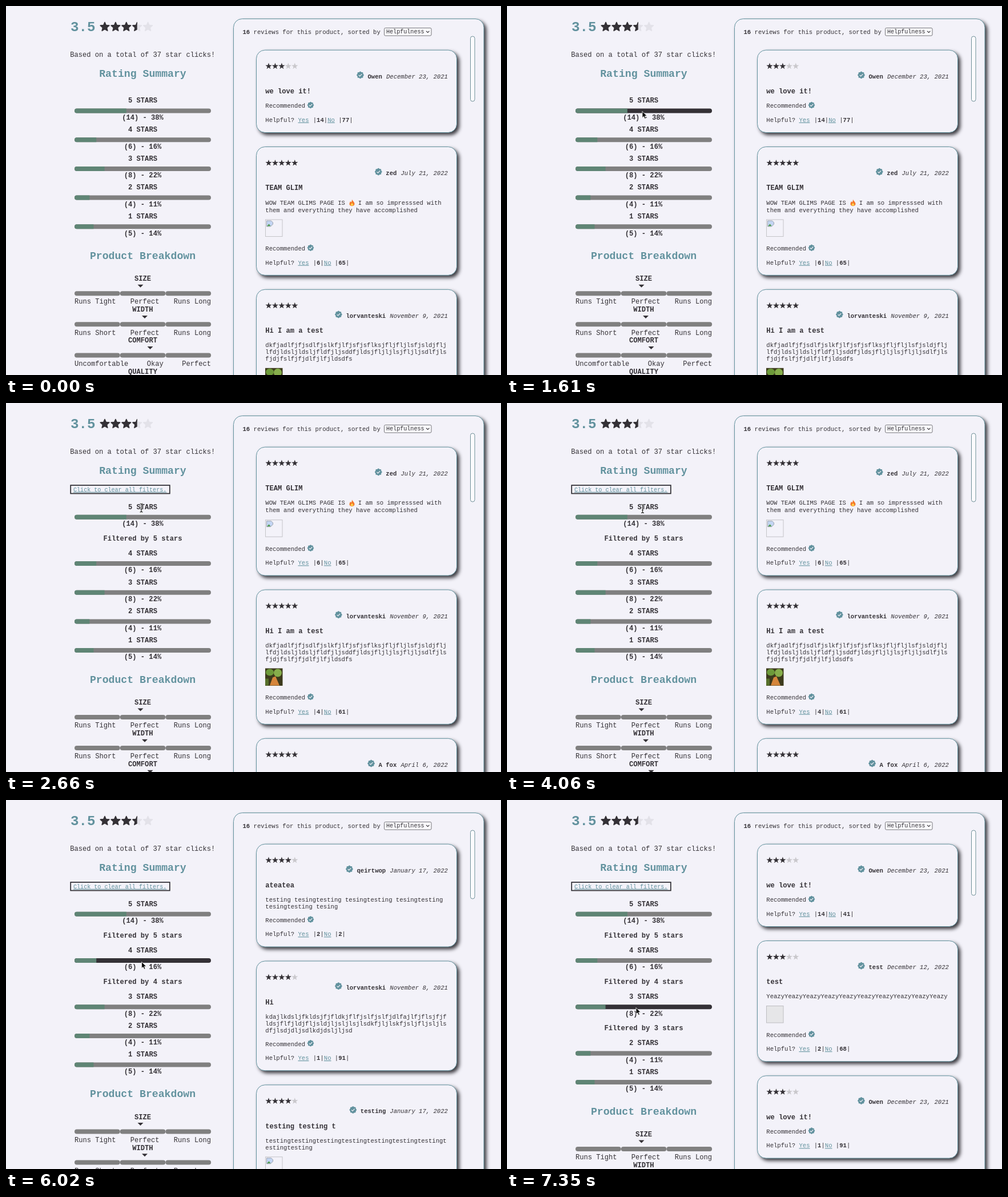
Write an HTML page that moves like this. It is 867x646 px and loops after 8 s.

```html
<!DOCTYPE html>
<html lang="en">
<head>
<meta charset="utf-8">
<title>Ratings and reviews</title>
<style>
  html, body { margin: 0; width: 100%; height: 100%; overflow: hidden; background: #f3f2f9; }
  svg { display: block; width: 867px; height: 646px; }
  text { font-family: "Liberation Mono", monospace; white-space: pre; fill: #343136; }
  .b { font-weight: bold; }
  .i { font-style: italic; }
  .teal { fill: #62929e; }
  .link { fill: #62929e; text-decoration: underline; }
  .card { fill: #f3f2f9; stroke: #62929e; filter: drop-shadow(4px 4px 3px #3b3a40); }
</style>
</head>
<body>
<svg viewBox="0 0 867 646" xmlns="http://www.w3.org/2000/svg">
  <g id="left"></g>
  <g id="right"></g>
  <g id="mouse"></g>
</svg>
<script>
const LOOP = 8000, STEP = 70;
const BG = '#f3f2f9', DARK = '#343136', TEAL = '#62929e';
const S = 10.59, M = 12.1, L = 18.16, XL = 24.2;   // font sizes
const CH = S * 0.6;
const el = id => document.getElementById(id);

// y is the middle of the capital letters
const text = (x, y, str, size = S, cls = '', anchor = 'start') =>
  `<text x="${x}" y="${y + size * 0.31}" font-size="${size}" class="${cls}" text-anchor="${anchor}">${str}</text>`;
const rect = (x, y, w, h, r, fill, more = '') =>
  `<rect x="${x}" y="${y}" width="${w}" height="${h}" rx="${r}" fill="${fill}" ${more}/>`;
const path = (d, fill, more = '') => `<path d="${d}" fill="${fill}" ${more}/>`;

function star(cx, cy, r, fill, more = '', inner = 0.42) {
  let d = '';
  for (let i = 0; i < 10; i++) {
    const a = (i / 5 - 0.5) * Math.PI, k = i % 2 ? r * inner : r;
    d += (i ? 'L' : 'M') + (cx + k * Math.cos(a)).toFixed(2) + ' ' + (cy + k * Math.sin(a)).toFixed(2);
  }
  return path(d + 'Z', fill, more);
}

function badge(cx, cy, r) {
  let d = '';
  for (let i = 0; i < 48; i++) {
    const a = i / 24 * Math.PI, k = r * (0.92 + 0.08 * Math.cos(8 * a));
    d += (i ? 'L' : 'M') + (cx + k * Math.cos(a)).toFixed(2) + ' ' + (cy + k * Math.sin(a)).toFixed(2);
  }
  return path(d + 'Z', TEAL) +
    path(`M${cx - 2.7} ${cy + 0.1}l1.9 1.9l3.6 -3.8`, 'none', `stroke="${BG}" stroke-width="1.2"`);
}

// ---- reviews ----
const flame = (x, y) =>
  path(`M${x} ${y - 6}c1 3 4.5 4.500 4.500 8c0 5 -9 5 -9 0c0 -2 1.200 -3 1.500 -4.500c1 .5 1.200 1 1.500 1.800c1 -1.500 1.500 -3 1.500 -5.300z`, '#f4792b') +
  path(`M${x} ${y}c.5 1.500 2.300 2.200 2.300 3.600c0 2.200 -4.600 2.200 -4.600 0c0 -1.400 1.800 -2 2.300 -3.600z`, '#fcd34a');

const thumbs = {
  broken: y => rect(454.5, y + 0.5, 29.500, 29.500, 0, 'none', 'stroke="#c4c4c8"') +
    path(`M456.500 ${y + 2.500}h8l3 3v3l-4 4h-7z`, '#c3d5f3', 'stroke="#8f949c" stroke-width=".8"') +
    path(`M457 ${y + 12}l3.500 -4l3 3.500z`, '#4f9a4b'),
  greens: y => rect(454, y, 30.500, 30.500, 0, '#3c3a1c') +
    `<ellipse cx="462" cy="${y + 7}" rx="7" ry="6" fill="#6d9a3a"/>` +
    `<ellipse cx="476" cy="${y + 8}" rx="7" ry="7" fill="#86ae4b"/>` +
    path(`M462 ${y + 30}l5 -14l5 -2l7 16z`, '#d5853b') +
    rect(454, y + 18, 6, 12, 0, '#57702b'),
  plain: y => rect(454.5, y + 0.5, 29.500, 29.500, 0, '#e6e6e8', 'stroke="#bdbdc1"')
};

const review = (stars, name, date, title, yes, no, body = [], pic = '') =>
  ({ stars, name, date, title, yes, no, body, pic });

const team = review(5, 'zed', 'July 21, 2022', 'TEAM GLIM', 6, 65,
  ['WOW TEAM GLIMS PAGE IS \u0001I am so impresssed with', 'them and everything they have accomplished'], 'broken');
const long = review(5, 'lorvanteski', 'November 9, 2021', 'Hi I am a test', 4, 61,
  ['dkfjadlfjfjsdlfjslkfjlfjsfjsflksjfljfljlsfjsldjflj',
   'lfdjldsljldsljfldfjljsddfjldsjfljljlsjfljljsdlfjls',
   'fjdjfslfjfjdlfjlfjldsdfs'], 'greens');
const love = (yes, no) => review(3, 'Owen', 'December 23, 2021', 'we love it!', yes, no);

const lists = [
  [love(14, 77), team, long],
  [team, long, review(5, 'A fox', 'April 6, 2022', '', 1, 1)],
  [review(4, 'qeirtwop', 'January 17, 2022', 'ateatea', 2, 2,
     ['testing tesingtesting tesingtesting tesingtesting', 'tesingtesting tesing']),
   review(4, 'lorvanteski', 'November 8, 2021', 'Hi', 1, 91,
     ['kdajlkdsljfkldsjfjfldkjflfjslfjslfjdlfajlfjflsjfjf',
      'ldsjflfjldjfljsldjljsljlsjlsdkfjljlskfjsljfljsljls',
      'dfjlsdjdljsdlkdjdsljljsd']),
   review(4, 'testing', 'January 17, 2022', 'testing testing t', 1, 1,
     ['testing'.repeat(7) + 't', 'estingtesting'], 'broken')],
  [love(14, 41),
   review(3, 'test', 'December 12, 2022', 'test', 2, 68, ['Yeazy'.repeat(10)], 'plain'),
   love(1, 91)]
];

function card(r, top) {
  const x = 454.3;
  let out = '';
  for (let i = 0; i < 5; i++)
    out += star(460 + i * 11.45, top + 28.3, 5.9, i < r.stars ? DARK : '#c9c8cc', '', 0.4);

  const dateX = 774 - r.date.length * CH, nameX = dateX - (r.name.length + 1) * CH - 0.7;
  out += text(dateX, top + 46.4, r.date, S, 'i') + text(nameX, top + 46.4, r.name, S, 'b') +
    badge(nameX - 13, top + 43.7, 6.4) + text(x, top + 72, r.title, M, 'b');

  let last = top + 74;
  const emoji = r.body.length && r.body[0].includes('\u0001');
  r.body.forEach((line, i) => {
    last = top + (emoji ? 98 + i * 13 : 97.5 + i * 12);
    const [head, tail] = line.split('\u0001');
    out += text(x, last, head);
    if (tail) out += flame(606, last) + text(616.7, last, tail);
  });
  if (r.pic) {
    out += thumbs[r.pic](last + 16);
    last += 43.5;
  }

  const rec = last + 24, help = rec + 24.3;
  out += text(x, rec, 'Recommended') + badge(533.5, rec - 1.7, 5.8);
  const bar = at => text(at, help, '|');
  const yesX = 544.1, noX = yesX + (`${r.yes}`.length + 1) * CH, cntX = noX + 4 * CH;
  out += text(x, help, 'Helpful?') + text(x + 9 * CH, help, 'Yes', S, 'link') +
    bar(yesX - CH) + text(yesX, help, r.yes, S, 'b') + bar(noX - CH) +
    text(noX, help, 'No', S, 'link') + bar(cntX - CH) + text(cntX, help, r.no, S, 'b') +
    bar(cntX + `${r.no}`.length * CH);

  const h = help + 22 - top;
  return { h, svg: rect(438.5, top, 351, h, 15, BG, 'class="card"') + out };
}

function reviews(state) {
  let out = rect(398.5, 22.5, 438.5, 700, 15, BG, 'class="card"') +
    text(414.5, 45.3, '16', S, 'b') + text(414.5 + 3 * CH, 45.3, 'reviews for this product, sorted by') +
    rect(662.5, 38.5, 82.500, 13.500, 2, '#f9f9fc', 'stroke="#77767b"') +
    text(666, 45.3, 'Helpfulness', 10.09) +
    path('M736 43.800l2.700 2.700l2.700 -2.700', 'none', `stroke="${DARK}" stroke-width="1.1"`) +
    rect(813.5, 53, 7.5, state % 3 ? 120 : 114, 3.7, '#fbfbfe', 'stroke="#6f8f98"');
  let top = 77.2;
  for (const r of lists[state]) {
    const c = card(r, top);
    out += c.svg;
    top += c.h + 25;
  }
  return out;
}

// ---- rating summary ----
const counts = [14, 6, 8, 4, 5];
const scales = [
  ['SIZE', 235.5, 'Runs Tight', 'Perfect', 'Runs Long'],
  ['WIDTH', 243, 'Runs Short', 'Perfect', 'Runs Long'],
  ['COMFORT', 252.5, 'Uncomfortable', 'Okay', 'Perfect'],
  ['QUALITY', 243, 'Poor', 'Okay', 'Perfect']
];
const MID = 239.5, BX = 120, BW = 239;

const rowTop = (i, state) => 165.6 + i * 50.7 + (state ? 16.3 : 0) + Math.min(i, state) * 30.5;
const barY = (i, state) => rowTop(i, state) + 17.9;

function summary(state, hover) {
  let out = text(113, 36.5, '3.5', XL, 'b teal');
  for (let i = 0; i < 5; i++) {
    const cx = 173 + i * 18.9, round = c => `stroke="${c}" stroke-width="1.6" stroke-linejoin="round"`;
    const put = (c, more) => star(cx, 36.7, 8.2, c, round(c) + more, 0.46);
    out += put(i < 3 ? DARK : '#e3e2e9', '');
    if (i === 3) out += put(DARK, ' clip-path="inset(0 50% 0 0)"');
  }
  out += text(112.3, 85.5, 'Based on a total of 37 star clicks!', M) +
    text(MID, 118, 'Rating Summary', L, 'b teal', 'middle');
  if (state)
    out += rect(113.2, 144, 173.600, 14.500, 0, BG, `stroke="#2c2b30" stroke-width="1.7"`) +
      text(118, 151.6, 'Click to clear all filters.', 10.09, 'link');

  counts.forEach((n, i) => {
    const y = rowTop(i, state), by = barY(i, state), w = BW * Math.round(n / 0.37) / 100;
    out += text(MID, y, `${5 - i} STARS`, M, 'b', 'middle') +
      rect(BX, by - 4, BW, 8, 4, hover === i ? DARK : '#808080') +
      path(`M${BX + w} ${by - 4}H${BX + 4}a4 4 0 0 0 0 8H${BX + w}z`, '#5f8575') +
      text(MID, y + 29.5, `(${n}) - ${Math.round(n / 0.37)}%`, M, 'b', 'middle');
    if (i < state)
      out += text(MID, y + 55.2, `Filtered by ${5 - i} stars`, M, 'b', 'middle');
  });

  const base = rowTop(5, state) + 18.4;
  out += text(MID, base, 'Product Breakdown', L, 'b teal', 'middle');
  scales.forEach(([name, tip, a, b, c], i) => {
    const y = base + 40 + i * 54.1, cw = M * 0.6;
    const gap = (BW - (a + b + c).length * cw) / 2;
    out += text(MID, y, name, M, 'b', 'middle') +
      path(`M${tip - 5} ${y + 10.3}h10l-5 5z`, DARK);
    for (let k = 0; k < 3; k++) out += rect(BX + k * 79.7, y + 21.700, 79.7, 8, 4, '#808080');
    out += text(BX, y + 40.2, a, M) + text(BX + a.length * cw + gap, y + 40.2, b, M) +
      text(BX + BW, y + 40.2, c, M, '', 'end');
  });
  return out;
}

// ---- pointer ----
const keys = [   // time, x, y
  [70, 300, 655], [630, 243, 212], [700, 243, 212], [1190, 238, 169], [1330, 238, 169],
  [1610, 237, 184.5], [1750, 237, 191], [1960, 237, 191], [2100, 237, 184.3], [2310, 237, 184.3],
  [2380, 237, 183.5], [3990, 237, 183.5], [4060, 237.5, 185], [4410, 239, 201.5], [4480, 239, 201.5],
  [5180, 238, 281], [5950, 238, 281], [6650, 226, 366.8], [6720, 226, 366.8], [7000, 226, 363.6],
  [8000, 226, 363.6]
];

function pointAt(t) {
  const n = keys.findIndex(k => k[0] > t);
  if (n < 1) return [300, 700];
  const [t0, x0, y0] = keys[n - 1], [t1, x1, y1] = keys[n];
  const u = (t - t0) / (t1 - t0), e = u * u * (3 - 2 * u);
  return [x0 + (x1 - x0) * e, y0 + (y1 - y0) * e];
}

const arrow = (x, y) =>
  path(`M${x} ${y}v11.200l2.600 -2.400l1.800 4.100l2 -.9l-1.800 -3.900h3.500z`, '#000',
    'stroke="#fff" stroke-width=".8"');
const beam = (x, y) => {
  const d = `M${x - 2.5} ${y - 7.500}q2.500 0 2.500 2q0 -2 2.500 -2M${x} ${y - 5.500}v11` +
    `M${x - 2.5} ${y + 7.500}q2.500 0 2.500 -2q0 2 2.500 2M${x - 1.5} ${y + 2.500}h3`;
  return path(d, 'none', 'stroke="#fff" stroke-width="2.2"') +
    path(d, 'none', 'stroke="#222" stroke-width="1.1"');
};

let shown = '', listed = -1, tick = -1;
function draw(ms) {
  const t = Math.floor(ms % LOOP / STEP + 1e-6) * STEP;
  if (t === tick) return;
  tick = t;
  const state = [2660, 5460, 7350].filter(s => t >= s).length;
  const [x, y] = pointAt(t);
  const hover = counts.findIndex((_, i) => Math.abs(y - barY(i, state)) <= 4.2);
  if (state !== listed) el('right').innerHTML = reviews(listed = state);
  if (shown !== state + ':' + hover) {
    shown = state + ':' + hover;
    el('left').innerHTML = summary(state, hover);
  }
  const pressing = t >= 2380 && t < 2660;
  el('mouse').innerHTML = (hover >= 0 && !pressing ? arrow : beam)(x, y);
}

const start = performance.now();
function frame() {
  draw(performance.now() - start);
  requestAnimationFrame(frame);
}
frame();
</script>
</body>
</html>
```
